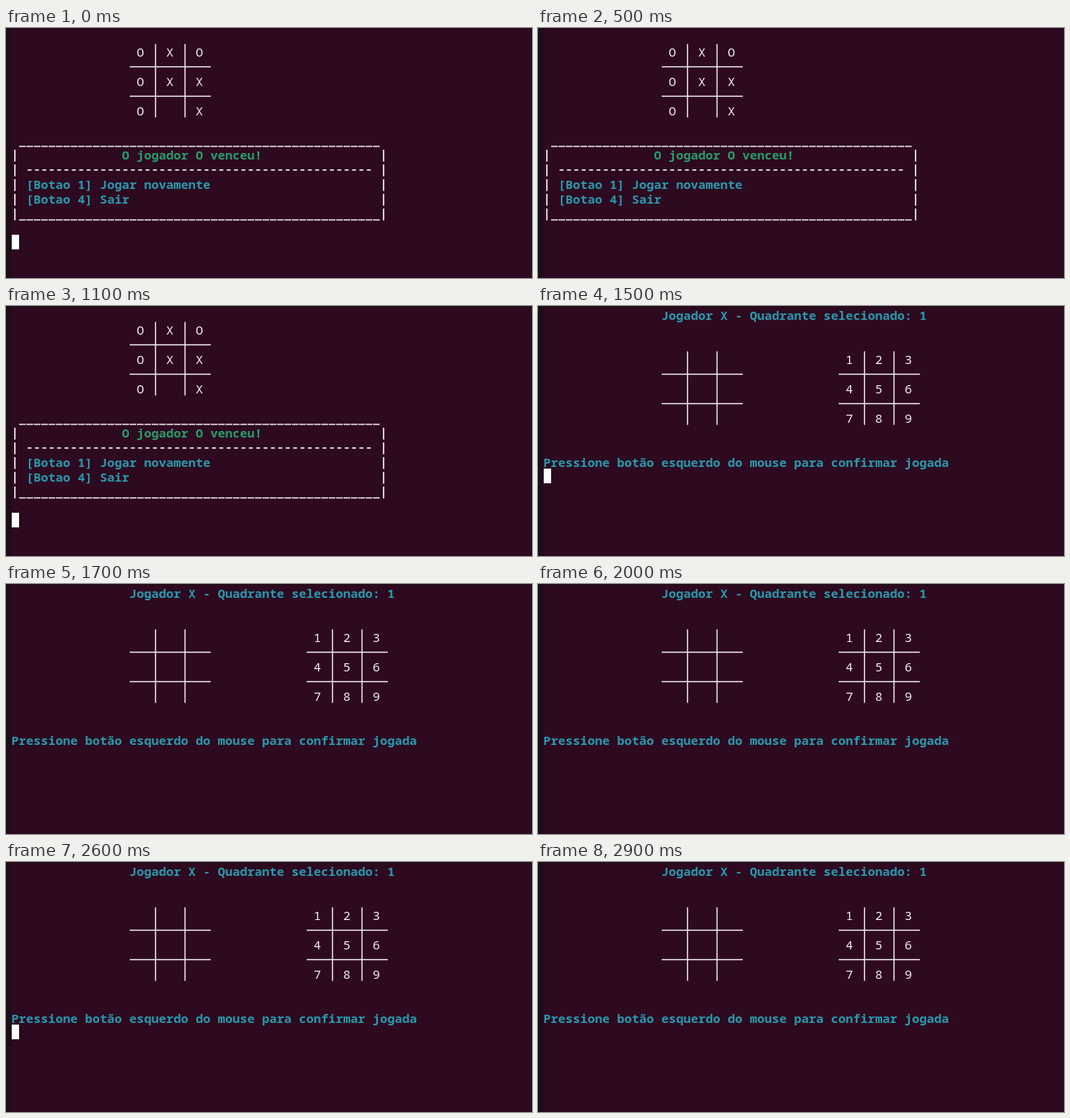
An HTML page with a canvas that plays this animation: 642x306 px, repeating every 4.1 s.

```html
<!DOCTYPE html>
<html lang="pt">
<head>
<meta charset="utf-8">
<title>Jogo da velha</title>
<style>
html, body { margin: 0; width: 100%; height: 100%; overflow: hidden; background: #2d0a20; }
canvas { display: block; }
</style>
</head>
<body>
<canvas id="stage" width="642" height="306"></canvas>
<script>
const ctx = document.getElementById('stage').getContext('2d');
const LOOP = 4100, SWITCH = 1500, BLINK = 600, FIRST_OFF = 500, LAST_OFF = 2900;
const CELL_W = 9, CELL_H = 18;
const WHITE = '#f4eff2', CYAN = '#2a9bae', GREEN = '#2a9d6b';
const FACE = '15px "Noto Sans Mono", "DejaVu Sans Mono", monospace';

const colX = c => 7 + c * CELL_W;
const rowY = r => 1 + r * CELL_H;

function rect(x, y, w, h, color) {
  ctx.fillStyle = color;
  ctx.fillRect(x, y, w, h);
}

function text(str, col, row, color, weight = 600) {
  ctx.font = weight + ' ' + FACE;
  ctx.fillStyle = color;
  ctx.fillText(str, colX(col) - 0.6, rowY(row) + 16);
}

function background() {
  rect(0, 0, 642, 306, '#2d0a20');
  rect(0, 0, 642, 1, '#1e0c17');
  rect(0, 0, 6, 306, '#1b0e16');
  rect(6, 0, 1, 306, '#250b1c');
}

function board(col, row, marks) {
  const x = colX(col), y = rowY(row);
  for (const i of [0, 1]) {
    rect(x + 30.8 + i * 36, y + 0.5, 1.4, 90, WHITE);
    rect(x, y + 27.8 + i * 36, 99, 1.4, WHITE);
  }
  [...marks].forEach((mark, i) =>
    text(mark, col + 1 + (i % 3) * 4, row + Math.floor(i / 3) * 2, WHITE, 500));
}

// Repeats one small bar in each cell from column a to column b.
function bars(a, b, row, dx, dy, w, h) {
  for (let col = a; col <= b; col++) rect(colX(col) + dx, rowY(row) + dy, w, h, WHITE);
}

function menu() {
  for (const row of [7, 12]) bars(1, 49, row, 0, 17.2, 8.2, 1.4);
  for (let row = 8; row <= 12; row++) {
    for (const col of [0, 50]) bars(col, col, row, 3, 4, 1.6, 14.5);
  }
  bars(2, 48, 9, 1.4, 10, 4.8, 1.6);
  text('O jogador O venceu!', 15, 8, GREEN);
  text('[Botao 1] Jogar novamente', 2, 10, CYAN);
  text('[Botao 4] Sair', 2, 11, CYAN);
}

function cursor(row) {
  rect(colX(0), rowY(row), CELL_W, CELL_H, '#ffffff');
}

function cursorOn(t) {
  if (t < FIRST_OFF) return true;
  if (t >= LAST_OFF) return false;
  return Math.floor((t - FIRST_OFF) / BLINK) % 2 === 1;
}

function resultScreen(lit) {
  board(16, 1, 'OXOOXXO X');
  menu();
  if (lit) cursor(14);
}

function turnScreen(lit) {
  text('Jogador X - Quadrante selecionado: 1', 16, 0, CYAN);
  board(16, 3, '');
  board(40, 3, '123456789');
  text('Pressione botão esquerdo do mouse para confirmar jogada', 0, 10, CYAN);
  if (lit) cursor(11);
}

const start = performance.now();

function draw(now) {
  const t = Math.max(0, now - start) % LOOP;
  background();
  (t < SWITCH ? resultScreen : turnScreen)(cursorOn(t));
  requestAnimationFrame(draw);
}

draw(start);
</script>
</body>
</html>
```
